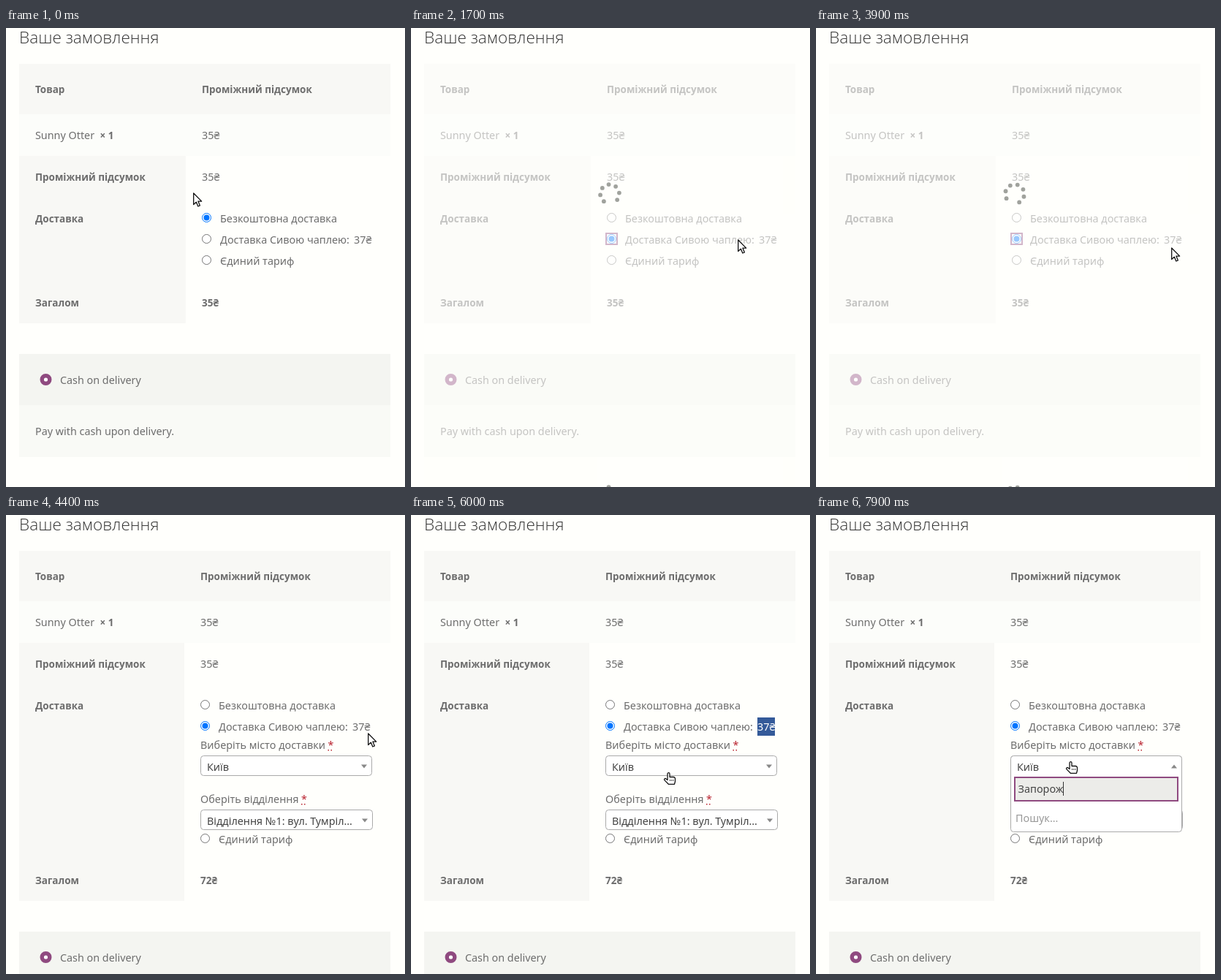
An HTML page that plays this animation: 546 by 628 pixels, repeating every 8000 ms.

```html
<!DOCTYPE html>
<html lang="uk">
<head>
<meta charset="utf-8">
<title>Замовлення</title>
<style>
html, body { margin: 0; width: 100%; height: 100%; overflow: hidden; background: #fffffc; }
svg { display: block; width: 546px; height: 628px; font: 14.35px "Noto Sans", "Open Sans", sans-serif; fill: #6d6d6d; }
text { white-space: pre; }
.bold { font-weight: 600; font-size: 13.5px; }
.title { font-family: "Open Sans", "Noto Sans", sans-serif; font-weight: 300; font-size: 22.6px; fill: #333; }
.dark { fill: #444; }
.pale { fill: #999; }
</style>
</head>
<body>
<svg id="stage" viewBox="0 0 546 628" width="546" height="628"></svg>
<script>
const stage = document.getElementById('stage');
const LOOP = 8000, STEP = 100;
const CLICK = 1400, FADE = 1500, UPDATE = 4200, SELECT = 4700, OPEN = 6500, SEARCH = 7000;
const PURPLE = '#8f4a80', PANEL = '#f8f8f5';
const QUERY = 'Запорож';
const KEY_TIMES = [7000, 7100, 7300, 7400, 7500, 7700, 7900];

// time, x, y of the pointer
const PATH = [
  [0, 256, 225], [400, 385, 272], [700, 496, 291], [900, 440, 289], [1100, 437, 288],
  [1900, 450, 289], [2700, 453, 289], [3700, 481, 297], [3900, 486, 300], [4300, 495, 298],
  [4500, 495, 298], [4600, 503, 296], [4700, 501, 285], [4900, 473, 282], [5300, 473, 282],
  [5500, 441, 314], [5600, 441, 314], [5800, 385, 374], [6000, 346, 352], [6200, 342, 337]
];

const pen = document.createElement('canvas').getContext('2d');
const textWidth = s => {
  pen.font = '14.35px "Noto Sans", "Open Sans", sans-serif';
  return pen.measureText(s).width;
};

const text = (x, y, s, cls = '', extra = '') => `<text x="${x}" y="${y}" class="${cls}" ${extra}>${s}</text>`;
const rect = (x, y, w, h, fill, extra = '') =>
  `<rect x="${x}" y="${y}" width="${w}" height="${h}" fill="${fill}" ${extra}/>`;
const circle = (x, y, r, fill, extra = '') => `<circle cx="${x}" cy="${y}" r="${r}" fill="${fill}" ${extra}/>`;

function pointerAt(t) {
  const i = PATH.findIndex(p => p[0] > t);
  if (i < 0) return PATH[PATH.length - 1].slice(1);
  const [t0, x0, y0] = PATH[i - 1], [t1, x1, y1] = PATH[i];
  const k = (t - t0) / (t1 - t0);
  return [x0 + (x1 - x0) * k, y0 + (y1 - y0) * k].map(Math.round);
}

function radio(x, y, checked, hover) {
  const color = checked ? (hover ? '#005cc8' : '#0075ff') : (hover ? '#4f4f4f' : '#767676');
  return circle(x, y, 6, '#fff', `stroke="${color}"`) + (checked ? circle(x, y, 4, color) : '');
}

function spinner(y, t) {
  const gap = 225 + (t - 2700) * 360 / 718;
  let dots = '';
  for (let i = 1; i < 8; i++) {
    const a = (gap + i * 45) * Math.PI / 180;
    dots += circle(272 + 13 * Math.cos(a), y + 13 * Math.sin(a), 2.9, '#62665f');
  }
  return dots;
}

function overlay(t) {
  if (t < FADE || t >= UPDATE) return '';
  const opacity = 0.6 * Math.min(1, (t - FADE + STEP) / 300);
  return `<g opacity="${opacity}">` +
    rect(18, 49, 508, 355, '#fffffc') + rect(18, 446, 508, 182, '#fffffc') +
    spinner(227, t) + spinner(641, t) + '</g>';
}

function table(updated) {
  const x = updated ? 266 : 268, total = updated ? 505 : 381;
  return text(18, 21, 'Ваше замовлення', 'title') +
    rect(18, 49, 508, 69, PANEL) + rect(18, 118, 508, 57, '#fcfdfa') +
    rect(18, 175, x - 40, total - 152, PANEL) +
    text(40, 89, 'Товар', 'bold') + text(x, 89, 'Проміжний підсумок', 'bold') +
    text(40, 152, 'Sunny Otter') + text(128.5, 152, '× 1', 'bold') + text(x, 152, '35₴') +
    text(40, 209, 'Проміжний підсумок', 'bold') + text(x, 209, '35₴') +
    text(40, 266, 'Доставка', 'bold') +
    text(40, total, 'Загалом', 'bold') + text(x, total, updated ? '72₴' : '35₴', 'bold');
}

function payment(y) {
  return rect(18, y, 508, 70, '#f4f5f1') + rect(18, y + 70, 508, 71, '#f9faf6') +
    circle(54.5, y + 35, 5.3, '#fff', `stroke="${PURPLE}" stroke-width="5.4"`) +
    text(74, y + 41, 'Cash on delivery') + text(40, y + 111, 'Pay with cash upon delivery.');
}

function shipping(t, updated, [px, py]) {
  const x = updated ? 272.5 : 274.5, tx = updated ? 291 : 293;
  const rows = [259.5, 288.5, updated ? 442.5 : 317.5];
  const labels = ['Безкоштовна доставка', 'Доставка Сивою чаплею:', 'Єдиний тариф'];
  const chosen = t >= CLICK ? 1 : 0;
  const blocked = t >= FADE && t < UPDATE;
  const marked = t >= SELECT && t < OPEN;
  let out = '';
  rows.forEach((y, i) => {
    const hover = !blocked && px >= 266 && px <= 503 && Math.abs(py - y) < 9;
    out += radio(x, y, i === chosen, hover) + text(tx, y + 6.5, labels[i]);
  });
  if (t >= CLICK && !updated) out += rect(267, 281, 15, 15, 'none', `stroke="${PURPLE}" stroke-width="2"`);
  // the dragged selection grows from the right edge
  const left = Math.max(474, Math.min(498, px));
  const from = t < 4900 ? left : 474;
  if (marked) out += rect(from, 277, 498 - from, 25, '#345a99');
  return out + text(tx + 183, 295, '37₴', '', marked && from < 480 ? 'style="fill:#fff"' : '');
}

function arrow(x, y, up) {
  const d = up ? -5 : 5;
  return `<path d="M${x - 4} ${y - d / 2}h8l-4 ${d}z" fill="#888"/>`;
}

function field(y, label, starX, value, width) {
  return text(266, y, label) + text(starX, y, '*', '', 'style="fill:#b8202c"') +
    rect(starX, y + 1, 1.5, 1.5, '#b8202c') + rect(starX + 4, y + 1, 1.5, 1.5, '#b8202c') +
    rect(266.5, y + 9.5, width, 27, '#fff', 'rx="4" stroke="#aaa"') +
    text(275, y + 30, value, 'dark');
}

function dropdown(t) {
  const searching = t >= SEARCH;
  const typed = QUERY.slice(0, KEY_TIMES.filter(k => k <= t).length);
  const bottom = searching ? 433.5 : 458.5;
  let out = rect(266.5, 329.5, 234, bottom - 329.5, '#fff', 'rx="4" stroke="#aaa"') +
    text(275, 350, 'Київ', 'dark') + arrow(490, 344, true) +
    rect(272, 359, 223, 32, '#ecece9', `stroke="${PURPLE}" stroke-width="2"`) +
    text(276.5, 380, typed, 'dark');
  if (t < 6800 || searching) out += rect(Math.round(276 + textWidth(typed)), 365, 1, 19, '#333');
  return out + (searching
    ? text(273, 420, 'Пошук…', 'pale')
    : text(273, 420, 'Будь ласка, введіть 1 або') + text(273, 446, 'більше літер'));
}

function fields(t) {
  return field(320, 'Виберіть місто доставки', 440.5, 'Київ', 234) + arrow(490, 344) +
    field(394, 'Оберіть відділення', 404, 'Відділення №1: вул. Тумріл…', 235) + arrow(491, 418) +
    (t >= OPEN ? dropdown(t) : '');
}

function pointer(t, [x, y]) {
  const hand = t >= 5900;
  const shape = hand
    ? '<path d="M5 10.5V2.2a1.5 1.5 0 0 1 3 0V6.5H13.2a2.3 2.3 0 0 1 2.3 2.3V12.5L14.5 16.3H6.3L1 10.9a1.4 1.4 0 0 1 2-2z"/>' +
      '<path d="M8.5 10v2M10.7 10v2M12.9 10v2" stroke-width=".8"/>'
    : '<path d="M.7 1V16.5l3.6-3.4 2.5 5.9 2.6-1.1-2.5-5.8h4.8z"/>';
  return `<g transform="translate(${x} ${y})" fill="#fff" stroke="#111" stroke-width="1.3" stroke-linejoin="round">${shape}</g>`;
}

function draw(t) {
  const updated = t >= UPDATE, at = pointerAt(t);
  stage.innerHTML = rect(0, 0, 546, 628, '#fffffc') + table(updated) + shipping(t, updated, at) +
    payment(updated ? 570 : 446) + (updated ? fields(t) : '') + overlay(t) + pointer(t, at);
}

const start = performance.now();
let shown = -1;
function tick() {
  const t = Math.floor((performance.now() - start) % LOOP / STEP) * STEP;
  if (t !== shown) draw(shown = t);
  requestAnimationFrame(tick);
}
tick();
</script>
</body>
</html>
```
